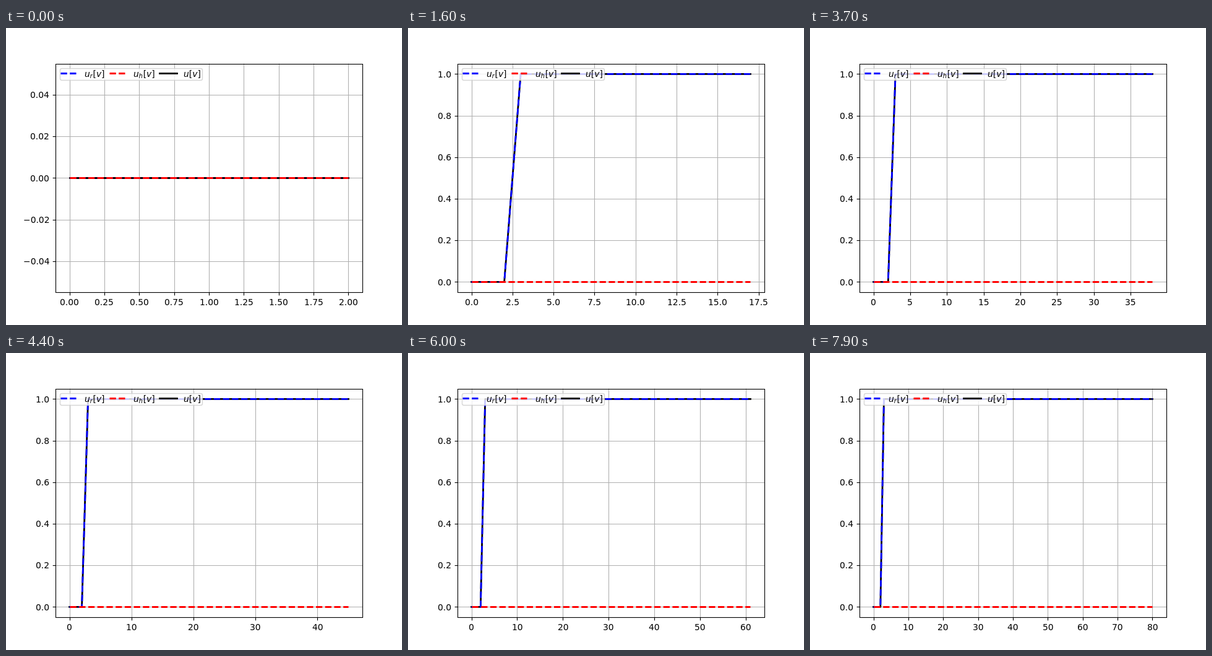
These frames come from a looping animation (640x480 px, 8000 ms). An HTML page with a canvas:

```html
<!DOCTYPE html>
<html lang="en">
<head>
<meta charset="utf-8">
<title>Step response plot</title>
<style>
  html, body { margin: 0; width: 100%; height: 100%; overflow: hidden; background: #fff; }
  canvas { display: block; }
</style>
</head>
<body>
<canvas id="plot" width="640" height="480"></canvas>
<script>
const ctx = document.getElementById('plot').getContext('2d');

const LOOP = 8000, STEP_MS = 100;
const PT = 100 / 72;                       // pixels per point
const LEFT = 80, RIGHT = 576, TOP = 57.6, BOTTOM = 427.2;
const MARGIN = 0.05, MAX_BINS = 9;
const THIN = 0.8 * PT, THICK = 2 * PT, TICK = 3.5 * PT;
const DASH = [7.4 * PT, 3.2 * PT];
const SIZE = 10 * PT;
const FAMILY = '"DejaVu Sans", sans-serif';

const snap = v => Math.floor(v + 0.5) + 0.5;

function stroke(points, color, width, { dash = [], cap = 'butt' } = {}) {
  ctx.strokeStyle = color;
  ctx.lineWidth = width;
  ctx.lineCap = cap;
  ctx.lineJoin = 'round';
  ctx.setLineDash(dash);
  ctx.beginPath();
  for (const [x, y] of points) ctx.lineTo(x, y);
  ctx.stroke();
  ctx.setLineDash([]);
}

// Smallest "nice" step that keeps the axis within MAX_BINS intervals.
function niceStep(span) {
  const raw = span / MAX_BINS;
  const scale = 10 ** Math.floor(Math.log10(raw));
  const factor = [1, 2, 2.5, 5, 10].find(f => f * scale >= raw - 1e-9);
  return factor * scale;
}

function ticks(lo, hi) {
  const step = niceStep(hi - lo);
  let digits = 0;
  while (Math.abs(step * 10 ** digits - Math.round(step * 10 ** digits)) > 1e-6) digits++;
  const list = [];
  for (let i = Math.ceil(lo / step - 1e-9); i * step <= hi + 1e-9; i++) {
    const value = i * step;
    const label = Math.abs(value).toFixed(digits);
    list.push({ value, label: i < 0 ? '\u2212' + label : label });
  }
  return list;
}

function drawAxes(xTicks, yTicks, px, py) {
  const floor = snap(BOTTOM), wall = snap(LEFT);
  for (const { value } of xTicks) {
    const x = snap(px(value));
    stroke([[x, TOP], [x, BOTTOM]], '#b0b0b0', THIN);
  }
  for (const { value } of yTicks) {
    const y = snap(py(value));
    stroke([[LEFT, y], [RIGHT, y]], '#b0b0b0', THIN);
  }

  ctx.fillStyle = '#000';
  ctx.font = `${SIZE}px ${FAMILY}`;
  for (const { value, label } of xTicks) {
    const x = px(value);
    stroke([[snap(x), floor], [snap(x), floor + TICK]], '#000', THIN);
    ctx.fillText(label, Math.round(x - ctx.measureText(label).width / 2), 448);
  }
  for (const { value, label } of yTicks) {
    const y = py(value);
    stroke([[wall, snap(y)], [wall - TICK, snap(y)]], '#000', THIN);
    const x = LEFT - 2 * TICK - ctx.measureText(label).width;
    ctx.fillText(label, Math.round(x), Math.round(y + 5.2));
  }
}

function drawFrame() {
  ctx.strokeStyle = '#000';
  ctx.lineWidth = THIN;
  ctx.lineJoin = 'miter';
  const x = snap(LEFT), y = snap(TOP);
  ctx.strokeRect(x, y, snap(RIGHT) - x, snap(BOTTOM) - y);
}

function drawMath(x, sub) {
  const base = 79;
  const put = (text, style, size, y) => {
    ctx.font = `${style} ${size}px ${FAMILY}`;
    ctx.fillText(text, x, y);
    x += ctx.measureText(text).width;
  };
  put('u', 'italic', SIZE, base);
  if (sub) {
    put(sub, 'italic', SIZE * 0.7, base + 2);
    x += 0.7;
  }
  put('[', 'normal', SIZE, base);
  put('v', 'italic', SIZE, base);
  put(']', 'normal', SIZE, base);
}

function drawLegend() {
  ctx.beginPath();
  ctx.roundRect(87.5, 65.5, 230, 19, 2.78);
  ctx.fillStyle = 'rgba(255,255,255,0.8)';
  ctx.fill();
  ctx.strokeStyle = 'rgba(204,204,204,0.8)';
  ctx.lineWidth = PT;
  ctx.stroke();

  const handle = (x, color, style) => stroke([[x, 73.5], [x + 28, 73.5]], color, THICK, style);
  handle(88.5, '#00f', { dash: DASH });
  handle(167.5, '#f00', { dash: DASH });
  handle(248.5, '#000', { cap: 'square' });

  ctx.fillStyle = '#000';
  drawMath(127, 'r');
  drawMath(206, 'h');
  drawMath(287, '');
}

function draw(time) {
  const last = Math.max(2, Math.floor((time % LOOP) / STEP_MS) + 1);
  const flat = last < 3;
  const pad = last * MARGIN;
  const xLo = -pad, xHi = last + pad;
  const yLo = flat ? -0.055 : -MARGIN, yHi = flat ? 0.055 : 1 + MARGIN;
  const px = v => LEFT + (v - xLo) / (xHi - xLo) * (RIGHT - LEFT);
  const py = v => BOTTOM - (v - yLo) / (yHi - yLo) * (BOTTOM - TOP);

  ctx.fillStyle = '#fff';
  ctx.fillRect(0, 0, 640, 480);
  drawAxes(ticks(xLo, xHi), ticks(yLo, yHi), px, py);

  const zero = [[snap(px(0)), snap(py(0))], [snap(px(last)), snap(py(0))]];
  const step = flat ? zero : [[0, 0], [2, 0], [3, 1], [last, 1]].map(([x, y]) => [px(x), py(y)]);
  stroke(step, '#000', THICK, { cap: 'square' });
  stroke(step, '#00f', THICK, { dash: DASH });
  stroke(zero, '#f00', THICK, { dash: DASH });

  drawFrame();
  drawLegend();
}

function tick() {
  draw(performance.now());
  requestAnimationFrame(tick);
}
tick();
</script>
</body>
</html>
```
